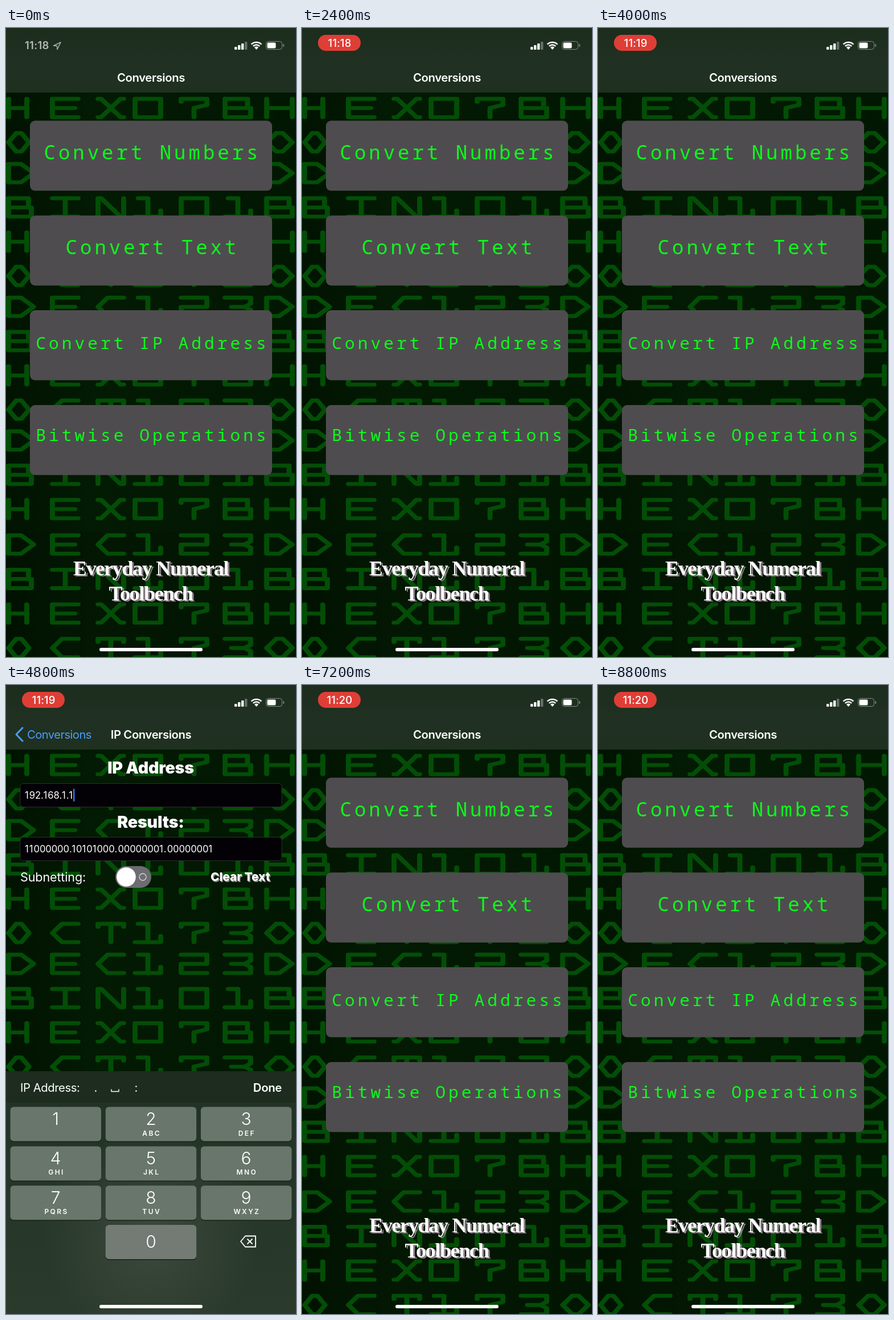
An HTML page with a canvas that plays this animation: 509x1101 px, repeating every 9600 ms.

```html
<!DOCTYPE html>
<html lang="en">
<head>
<meta charset="utf-8">
<title>Conversions</title>
<style>
html, body { margin: 0; width: 100%; height: 100%; overflow: hidden; background: #031503; }
canvas { display: block; width: 509px; height: 1101px; }
</style>
</head>
<body>
<canvas id="stage" width="509" height="1101"></canvas>
<script>
const W = 509, H = 1101, STEP = 800;
const ctx = document.getElementById('stage').getContext('2d');
const SANS = 'Inter, "Liberation Sans", sans-serif';
const MONO = '"Noto Sans Mono", "DejaVu Sans Mono", monospace';
const SERIF = '"Liberation Serif", serif';
const BLUE = '#4a9df8';

// Strokes on a grid 8 wide and 6 high
const GLYPHS = {
  H: '00 06,80 86,03 83', E: '80 00 06 86,03 73', X: '00 10 76 86,80 70 16 06',
  0: '00 80 86 06 00', 7: '01 00 80 82 43 46', B: '00 06 86 83 03,00 70 73',
  O: '30 50 83 56 36 03 30', C: '80 30 03 36 86', T: '01 00 80 81,40 46',
  1: '10 40 46,06 86 84', 3: '00 80 82 63 84 86 06,23 63', D: '00 06 46 83 40 00',
  2: '00 80 83 03 06 86', I: '00 80,40 46,06 86', N: '06 00 10 76 86 80'
};
const COLS = [0, 77, 157, 222, 303, 380, 453];
// Word, offset in the block, width of its first letter
const ROWS = [['HEX07BH', 0, 41], ['OCT173O', 60, 45], ['DEC123D', 114, 53], ['BIN101B', 174, 49]];

function rect(x, y, w, h, r, fill, line) {
  ctx.beginPath();
  ctx.roundRect(x, y, w, h, r);
  if (fill) { ctx.fillStyle = fill; ctx.fill(); }
  if (line) { ctx.strokeStyle = line; ctx.lineWidth = 1; ctx.stroke(); }
}

function disc(x, y, r, fill) {
  ctx.beginPath();
  ctx.arc(x, y, r, 0, 7);
  ctx.fillStyle = fill;
  ctx.fill();
}

function line(points, width, color, close) {
  ctx.beginPath();
  points.forEach(([x, y]) => ctx.lineTo(x, y));
  if (close) ctx.closePath();
  ctx.lineWidth = width;
  ctx.strokeStyle = color;
  ctx.lineJoin = ctx.lineCap = 'round';
  ctx.stroke();
}

function text(s, x, y, size, o = {}) {
  ctx.font = `${o.weight || 400} ${size}px ${o.font || SANS}`;
  ctx.letterSpacing = (o.gap ?? -0.03 * size) + 'px';
  ctx.textAlign = o.align || 'left';
  if (o.shadow) {
    ctx.fillStyle = o.shadow;
    ctx.fillText(s, x + (o.dx || 1.5), y + 1.5);
  }
  ctx.fillStyle = o.color || '#fff';
  ctx.fillText(s, x, y);
  return ctx.measureText(s).width;
}

// Text with figures: ones and dots are set more loosely
function figures(s, x, y, size, gap) {
  const left = x;
  for (const run of s.match(/[1.]+|[^1.]+/g) || []) {
    x += text(run, x, y, size, { gap: /[1.]/.test(run) ? gap + size * 0.07 : gap });
  }
  return x - left;
}

function patternRow(word, y, first) {
  [...word].forEach((ch, i) => {
    const unit = ((i ? 54 : first) - 9) / 8;
    ctx.save();
    ctx.translate(COLS[i] + 4.5, y - 16);
    ctx.scale(1.3, 1);
    for (const part of GLYPHS[ch].split(',')) {
      line(part.split(' ').map(p => [p[0] * unit / 1.3, p[1] * 5.35]), 6.8, '#034e06');
    }
    ctx.restore();
  });
}

function backdrop() {
  const g = ctx.createLinearGradient(0, 0, W, 0);
  g.addColorStop(0, '#011301');
  g.addColorStop(0.3, '#031a03');
  g.addColorStop(1, '#021702');
  ctx.fillStyle = g;
  ctx.fillRect(0, 0, W, H);
  for (let top = 140; top < 860; top += 234) {
    for (const [word, dy, first] of ROWS) {
      if (top + dy < 870) patternRow(word, top + dy, first);
    }
  }
  ctx.fillStyle = 'rgba(0,0,0,.1)';
  ctx.fillRect(0, 883, W, H - 883);
  [2, 3, 0, 1].forEach((n, i) => patternRow(ROWS[n][0], 904 + i * 60.4, ROWS[n][2]));
}

function statusBar(time, pill) {
  if (pill) {
    rect(28, 12, 75, 28, 14, pill);
    text(time, 66, 33, 18.5, { align: 'center', weight: 500, gap: 0.1 });
  } else {
    text(time, 33, 37, 18.5, { weight: 600, color: '#b4bab5', gap: 0.3 });
    line([[83.5, 31], [96, 25], [90, 37.5], [89.5, 31.5]], 1.5, '#a9b0aa', true);
  }
  for (let i = 0; i < 4; i++) {
    const h = 5 + i * 3;
    rect(401 + i * 6, 38 - h, 4.4, h, 1, i < 3 ? '#fff' : '#647066');
  }
  ctx.lineCap = 'butt';
  ctx.strokeStyle = '#fff';
  ctx.lineWidth = 2.7;
  for (const r of [8, 12.5]) {
    ctx.beginPath();
    ctx.arc(439.5, 37.5, r, -Math.PI * 0.75, -Math.PI * 0.25);
    ctx.stroke();
  }
  ctx.beginPath();
  ctx.moveTo(439.5, 38);
  ctx.arc(439.5, 37.5, 5, -Math.PI * 0.75, -Math.PI * 0.25);
  ctx.fillStyle = '#fff';
  ctx.fill();
  rect(456.5, 23.5, 28, 14, 4, null, '#859087');
  rect(458.5, 25.5, 15, 10, 2, '#fff');
  rect(486.5, 28, 1.6, 5, 1, '#859087');
}

function navBar(s) {
  const g = ctx.createLinearGradient(0, 0, 0, 113);
  g.addColorStop(0, '#1c2d1d');
  g.addColorStop(0.5, '#203022');
  g.addColorStop(1, '#1f3020');
  ctx.fillStyle = g;
  ctx.fillRect(0, 0, W, 113);
  statusBar(s.time, s.pill);
  text(s.title, 254.5, 93.5, 20.3, { weight: 600, align: 'center', gap: -0.4 });
  if (s.back) {
    line([[29, 75], [18, 86.5], [29, 98]], 3, BLUE);
    text(s.back, 37, 93.5, 20.3, { color: BLUE });
  }
}

function home(s) {
  const items = [
    ['Convert Numbers', 230, 34, 25.4], ['Convert Text', 396, 34, 25.4],
    ['Convert IP Address', 562, 29.5, 22.75], ['Bitwise Operations', 723, 29.5, 22.75]
  ];
  items.forEach(([label, y, size, pitch], i) => {
    rect(42, 162.3 + i * 165.9, 425, 122.5, 9, '#4f4c4f');
    const gap = pitch - size * 0.6;
    text(label, 254.5 + gap / 2, y, size, { font: MONO, weight: 500, align: 'center', color: '#0cfc1c', gap });
  });
  const logo = { font: SERIF, weight: 700, align: 'center', shadow: '#8d7f89', dx: 3, gap: -1.3 };
  text('Everyday Numeral', 254, 958, 36, logo);
  text('Toolbench', 254, 1002, 36, logo);
  homeLine();
}

function homeLine() {
  rect(164, 1085, 181, 6, 3, '#fff');
}

const heading = (s, y, x = 254) =>
  text(s, x, y, 28.6, { weight: 900, align: 'center', gap: -0.2 });

function field(y, value, caret, open) {
  rect(25, y + 0.5, 459, 41, open ? [5, 0, 0, 5] : 5, '#030105', '#2a302b');
  const w = figures(value, 33, y + 27, 16.7, -0.15);
  if (caret) rect(33 + w, y + 9.5, 2.4, 22.5, 1, caret);
}

function toggle(label, y, on) {
  text(label, 25, y + 8, 21.6, { gap: -0.15 });
  rect(192, y - 19, 63, 38, 19, on ? '#32d158' : '#6d6c72');
  if (on) {
    line([[206, y - 6], [206, y + 6]], 1.3, '#fff');
  } else {
    ctx.beginPath();
    ctx.arc(240, y, 6, 0, 7);
    ctx.strokeStyle = '#d6d6d8';
    ctx.lineWidth = 1.3;
    ctx.stroke();
  }
  disc(on ? 235.5 : 211, y, 16.8, '#fff');
}

const clearText = y =>
  text('Clear Text', 359, y, 20.8, { weight: 800, shadow: '#858585', gap: 0 });

function numbers(s) {
  ['Decimal:', 'Binary:', 'Hexadecimal:', 'Octal:'].forEach((name, i) => {
    heading(name, [151, 246, 339.5, 434][i]);
    field([168, 262, 355, 450][i], s.values[i], i ? null : '#3478f6');
  });
  toggle('Signed Integer:', 520, s.on);
  clearText(527);
}

function strings() {
  const rows = [
    ['String:', 151, 168, 'Demo'], ['Decimal:', 246, 262, '68 101 109 111'],
    ['Binary:', 340, 358, '1000100 1100101 1101101 1101111'],
    ['Hexadecimal:', 434, 450, '44 65 6D 6F']
  ];
  rows.forEach(([name, y, top, value], i) => {
    heading(name, y);
    field(top, value, i ? null : '#0e2744');
  });
  clearText(527);
}

function address(s) {
  heading('IP Address', 155);
  field(172, s.ip, s.on ? null : '#3478f6');
  heading(s.on ? 'Subnet Mask:' : 'Results:', 250);
  field(266, s.result, s.on && !s.list ? '#3478f6' : null);
  toggle('Subnetting:', 336, s.on);
  clearText(343);
  if (!s.on) return;
  heading('How Many Subnets', 392, 299);
  field(404, s.list ? '2' : '', s.list && '#3478f6', true);
  if (!s.list) return;
  const lines = [
    [25, 'IP Address: Class C'], [25, '#'],
    [25, '0: 11000000.10101000.00000001.00000000 (192.168.1.0)'],
    [94, 'Broadcast ID: 192.168.1.63'], [94, 'Host Range: 192.168.1.1 - 192.168.1.62'],
    [25, '1: 11000000.10101000.00000001.01000000 (192.168.1.64)'],
    [94, 'Broadcast ID: 192.168.1.127'], [94, 'Host Range: 192.168.1.65 - 192.168.1.126'],
    [25, 'Bits Stolen: 1']
  ];
  ctx.save();
  ctx.beginPath();
  ctx.rect(25, 450, 460, 226);
  ctx.clip();
  lines.forEach(([x, t], i) => figures(t, x, 475 + i * 24.9, 20.2, -0.45));
  text('Subnet ID', 59, 499.9, 20.2, { gap: -0.45 });
  ctx.restore();
}

function bitwise() {
  heading('Integer One:', 151);
  field(168, '52');
  heading('Integer Two:', 246);
  field(262, '2', '#3478f6');
  rect(25, 315, 459, 35, 8, '#44b565');
  rect(27, 317, 70, 31, 7, '#87c997');
  ['&', '|', '^', '~', '<<', '>>'].forEach((op, i) => {
    const x = 62.3 + i * 76.8;
    text(op, x, 338, 15, { align: 'center', weight: i ? 400 : 500, gap: 0 });
    if (i > 1) rect(x - 38.5, 324, 1, 17, 0, '#3b9d57');
  });
  heading('Results:', 385);
  field(401, '(52) - ' + '110100'.padStart(32, '0'));
  field(453, '(2) - ' + '10'.padStart(32, '0'));
  heading('Bitwise AND', 529.5);
  field(546, '(0) - ' + '0'.repeat(32));
  clearText(623);
}

function panel(label, extra) {
  const g = ctx.createLinearGradient(0, 731, 0, H);
  g.addColorStop(0, '#223326');
  g.addColorStop(1, '#2a3a2b');
  ctx.fillStyle = g;
  ctx.fillRect(0, 676, W, H - 676);
  const glow = ctx.createRadialGradient(254, 965, 10, 254, 965, 190);
  glow.addColorStop(0, 'rgba(105,110,105,.3)');
  glow.addColorStop(1, 'rgba(105,110,105,0)');
  ctx.fillStyle = glow;
  ctx.fillRect(0, 770, W, H - 770);
  ctx.fillStyle = '#1d2c1f';
  ctx.fillRect(0, 676, W, 55);
  text(label, 25, 711.5, 20.3, { gap: -0.45 });
  if (extra) {
    text('.', 157, 711.5, 20.3, { align: 'center' });
    line([[185, 708], [185, 711.5], [198, 711.5], [198, 708]], 1.4, '#fff');
    text(':', 228, 711.5, 20.3, { align: 'center' });
  }
  text('Done', 484, 711.5, 20.3, { weight: 600, align: 'right', gap: -0.3 });
  homeLine();
}

function key(x, y, w, h, fill = '#69766b') {
  rect(x, y + 1.5, w, h, 6, '#17221a');
  rect(x, y, w, h, 6, fill);
}

function eraser(x, y) {
  line([[x - 13, y], [x - 5, y - 9.5], [x + 13, y - 9.5], [x + 13, y + 9.5], [x - 5, y + 9.5]], 1.8, '#fff', true);
  line([[x - 1, y - 4], [x + 7, y + 4]], 1.8, '#fff');
  line([[x + 7, y - 4], [x - 1, y + 4]], 1.8, '#fff');
}

function numPad() {
  const subs = ['', 'ABC', 'DEF', 'GHI', 'JKL', 'MNO', 'PQRS', 'TUV', 'WXYZ'];
  subs.forEach((sub, i) => {
    const x = 7.5 + i % 3 * 167.2, y = 738.5 + Math.floor(i / 3) * 68.9;
    key(x, y, 159.5, 60);
    text(i + 1, x + 79.7, y + 31.5, 30, { align: 'center', weight: 300, gap: 0 });
    text(sub, x + 81, y + 50, 12, { align: 'center', weight: 600, gap: 2.4 });
  });
  key(174.7, 945, 159.5, 60, '#737b74');
  text('0', 254.4, 984.5, 30, { align: 'center', weight: 300, gap: 0 });
  eraser(425, 974);
}

function qwerty() {
  const rows = [['qwertyuiop', 5, 741], ['asdfghjkl', 30.5, 810], ['zxcvbnm', 82, 878.7]];
  for (const [letters, left, y] of rows) {
    [...letters].forEach((ch, i) => {
      const x = left + i * 50.55;
      key(x, y, 43.5, 55);
      text(ch, x + 21.8, y + 35.5, 31, { align: 'center', weight: 300, gap: 0 });
    });
  }
  const dark = '#414d44', label = { align: 'center', gap: -0.3 };
  key(5, 878.7, 55, 55, dark);
  line([[33, 896], [45, 908], [39, 908], [39, 917], [27, 917], [27, 908], [21, 908]], 1.8, '#fff', true);
  key(449, 878.7, 55, 55, dark);
  eraser(476, 907);
  key(5, 947.5, 121, 55, dark);
  text('123', 65, 982, 20, label);
  key(133, 947.5, 244, 55, '#717a73');
  text('space', 255, 981, 20.3, label);
  key(385, 947.5, 119, 55, '#047aff');
  text('done', 444, 981, 20.3, label);
  rect(453.5, 1033, 11, 21, 5.5, '#fff');
  ctx.beginPath();
  ctx.arc(459, 1049, 10.5, 0, Math.PI);
  ctx.lineWidth = 2.2;
  ctx.strokeStyle = '#fff';
  ctx.stroke();
  line([[448.5, 1045], [448.5, 1049]], 2.2, '#fff');
  line([[469.5, 1045], [469.5, 1049]], 2.2, '#fff');
  line([[459, 1060], [459, 1066]], 2.2, '#fff');
  line([[452, 1066.5], [466, 1066.5]], 2.2, '#fff');
}

const RED = '#df3e36', BRIGHT = '#ff443a';
const menu = (time, pill) => ({ view: home, title: 'Conversions', time, pill });
const page = (view, title, time, label, rest) =>
  ({ view, title, time, label, pill: RED, back: 'Conversions', pad: numPad, ...rest });
const ipPage = rest => page(address, 'IP Conversions', '11:19', 'IP Address:', rest);

const scenes = [
  menu('11:18'),
  page(numbers, 'Unsigned Integer Conversions', '11:18', 'Decimal:',
    { back: 'Back', values: ['25', '11001', '19', '31'] }),
  page(numbers, 'Signed Integer Conversions', '11:18', 'Decimal:',
    { back: 'Back', on: true, values: ['-25', '11100111', 'E7', '347'] }),
  menu('11:18', RED),
  page(strings, 'String Conversions', '11:19', 'String:', { pad: qwerty, pill: BRIGHT }),
  menu('11:19', RED),
  ipPage({ ip: '192.168.1.1', result: '11000000.10101000.00000001.00000001', extra: true }),
  ipPage({ ip: '192:168:1:1', result: '255.255.255.128', on: true }),
  ipPage({ ip: '192:168:1:1', result: '255.255.255.128', on: true, list: true }),
  menu('11:20', RED),
  page(bitwise, 'Bitwise Operations', '11:20', 'Bitwise:'),
  menu('11:20', RED)
];

function draw(s) {
  backdrop();
  navBar(s);
  s.view(s);
  if (s.pad) {
    panel(s.label, s.extra);
    s.pad();
  }
}

let start, shown = -1;
function tick(now) {
  start ??= now;
  const n = Math.floor((now - start) / STEP) % scenes.length;
  if (n !== shown) draw(scenes[shown = n]);
  requestAnimationFrame(tick);
}
draw(scenes[0]);
requestAnimationFrame(tick);
</script>
</body>
</html>
```
